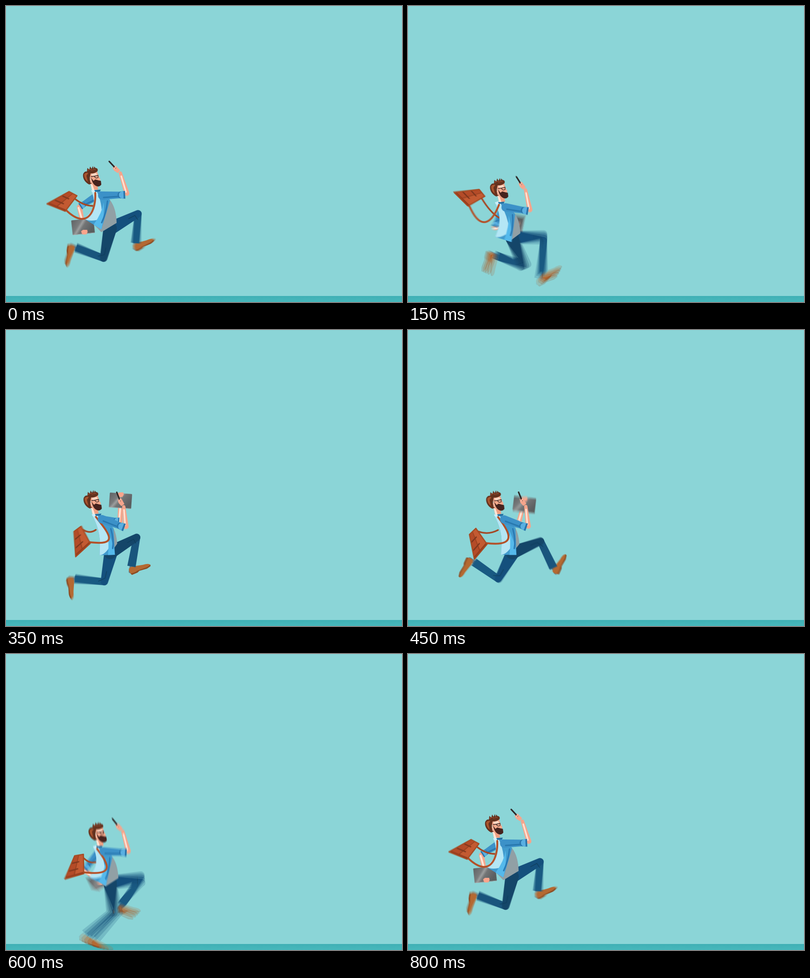
An HTML page that plays this animation: 852x640 px, repeating every 0.85 s.

```html
<!DOCTYPE html>
<html lang="en">
<head>
<meta charset="utf-8">
<title>Runner</title>
<style>
html, body { margin: 0; width: 100%; height: 100%; overflow: hidden; background: #8bd5d7; }
svg { display: block; width: 100vw; height: 100vh; }
#runner { isolation: isolate; }
#runner > g { mix-blend-mode: plus-lighter; }
</style>
</head>
<body>
<svg viewBox="0 0 852 640">
  <defs>
    <linearGradient id="metal" x2="1" y2=".5">
      <stop offset="0" stop-color="#5d6062"/><stop offset=".38" stop-color="#77797a"/>
      <stop offset=".48" stop-color="#9a9c9c"/><stop offset=".6" stop-color="#717374"/>
      <stop offset="1" stop-color="#595c5e"/>
    </linearGradient>
    <linearGradient id="ground" x2="0" y2="1">
      <stop offset="0" stop-color="#3fb0b5"/><stop offset="1" stop-color="#47b8bc"/>
    </linearGradient>
  </defs>
  <rect width="852" height="640" fill="#8bd5d7"/>
  <rect y="627" width="852" height="13" fill="url(#ground)"/>
  <g id="runner"></g>
</svg>
<script>
const LOOP = 850, STEP = 50, CYCLE = 800, STRIDE = CYCLE / 2, SHUTTER = 15, COPIES = 5;
const { sin, cos, exp, max, hypot, atan2, PI } = Math;
const RAD = PI / 180;

const wrap = (t, period) => ((t % period) + period) % period;
const f = v => v.toFixed(1);
const P = p => f(p[0]) + ',' + f(p[1]);
const mix = (a, b, u) => [a[0] + (b[0] - a[0]) * u, a[1] + (b[1] - a[1]) * u];
const add = (a, x, y) => [a[0] + x, a[1] + y];
const bend = (a, b, c, u) => mix(mix(a, b, u), mix(b, c, u), u);
const heading = (a, b) => atan2(b[1] - a[1], b[0] - a[0]) / RAD;
// Angles of hanging parts: 0 is straight down, 90 is forward
const hang = (p, angle, len) => add(p, sin(angle * RAD) * len, cos(angle * RAD) * len);

// Periodic cubic through rows of [time, ...values]
function sample(rows, t) {
  const n = rows.length;
  t = wrap(t, CYCLE);
  let i = n - 1;
  while (i > 0 && rows[i][0] > t) i--;
  const row = j => rows[wrap(j, n)];
  const time = j => row(j)[0] + CYCLE * Math.floor(j / n);
  const t1 = time(i), t2 = time(i + 1), d = t2 - t1, u = (t - t1) / d, u2 = u * u, u3 = u2 * u;
  return row(i).slice(1).map((p, k) => {
    const q = row(i + 1)[k + 1];
    const m1 = (q - row(i - 1)[k + 1]) / (t2 - time(i - 1)) * d;
    const m2 = (row(i + 2)[k + 1] - p) / (time(i + 2) - t1) * d;
    return (2 * u3 - 3 * u2 + 1) * p + (u3 - 2 * u2 + u) * m1 + (3 * u2 - 2 * u3) * q + (u3 - u2) * m2;
  });
}

// Everything above the hip follows these three rules
function bob(t) {
  const d = wrap(t, STRIDE) - 150;
  return 26 * exp(-((d / (d < 0 ? 50 : 78)) ** 2));
}
const lean = t => 6 + 6 * cos(2 * PI * (t - 190) / STRIDE);
const swing = t => (1 - sin(PI / 2 * cos(2 * PI * (t - 750) / CYCLE))) / 2;

// time, thigh, shin
const gait = [
  [0, 118, -5], [50, 112, 26], [150, 92, -3], [200, 7, -46], [250, -16, -64],
  [400, -12, -111], [450, -29, -125], [550, 22, -112], [600, 98, -37], [700, 118, -13]
];
// time, x, y, turn
const bagSwing = [
  [0, 140, 427, 37], [150, 147, 422, 60], [250, 181, 438, -4],
  [450, 158, 446, -35], [600, 167, 454, -1], [700, 150, 440, 26]
];
// collar, back, rear hem, front hem, chest, belly, tee front, tee bottom
const shirtOpen = [[194, 398], [197, 428], [168, 460], [205, 483], [224, 420], [237, 437], [238, 469], [205, 489]];
const shirtShut = [[195, 398], [203, 432], [201, 487], [234, 486], [231, 429], [237, 440], [239, 462], [232, 472]];
// shoulder, elbow, wrist, hand, phone tip
const armHigh = [[207, 410], [259, 408], [246, 361], [237, 352], [222, 336]];
const armLow = [[206, 409], [257, 428], [253, 382], [247, 371], [238, 351]];

const shape = (d, fill) => `<path d="${d}" fill="${fill}"/>`;
const poly = (pts, fill) => shape('M' + pts.map(P).join('L') + 'Z', fill);
const line = (d, color, w) => `<path d="${d}" fill="none" stroke="${color}" stroke-width="${w}" stroke-linecap="round"/>`;
const place = (p, turn, body) => `<g transform="translate(${P(p)}) rotate(${f(turn)})">${body}</g>`;

function limb(a, b, wa, wb, fill, square) {
  const dx = b[0] - a[0], dy = b[1] - a[1], len = hypot(dx, dy) || 1;
  const off = (p, w) => P(add(p, -dy / len * w / 2, dx / len * w / 2));
  const arc = w => `A${w / 2},${w / 2} 0 0 0 `;
  return shape(`M${off(a, wa)}L${off(b, wb)}${square ? 'L' : arc(wb)}${off(b, -wb)}L${off(a, -wa)}${arc(wa)}${off(a, wa)}Z`, fill);
}

const shoe =
  shape('M-1,-7Q7,-10 14,-7L30,-3Q44,-2 45,4L35,7L18,5L13,7L0,7Q-4,0 -1,-7Z', '#b1692f') +
  shape('M-2,4Q8,6 14,4L36,5L45,3L44,6L35,8L18,6L13,8L0,8Z', '#8b4b22');

function leg(t, sink, hip, main, lower) {
  const [thigh, shin] = sample(gait, t);
  const reach = .7 * sink * max(0, cos(shin * RAD));
  const knee = hang(hip, thigh, 66), cuff = hang(knee, shin, 64 + reach), heel = hang(cuff, shin, 11);
  const fold = mix(knee, hip, .12);
  return line(`M${P(cuff)}L${P(heel)}`, '#68777f', 8) + place(heel, -1.2 * shin - 35, shoe) +
    limb(knee, cuff, 15, 18, lower, true) + limb(hip, knee, 29, 16, main) +
    line(`M${P(mix(knee, cuff, .2))}L${P(fold)}L${P(mix(knee, hip, .35))}`, '#0d3b59', 1.2);
}

function sleeve(sh, el, w) {
  const cuff = mix(sh, el, .78);
  return limb(sh, cuff, w, w - 4, '#3a8fc4') +
    line(`M${P(add(sh, 3, 4))}L${P(add(cuff, -2, 3))}`, '#2675ad', 3) +
    limb(cuff, mix(sh, el, .95), w - 3, w - 1, '#2472a8', true) +
    limb(mix(sh, el, .84), mix(sh, el, .88), w - 2, w - 2, '#57aede', true);
}

function farArm(t, u, move) {
  const drift = sin(2 * PI * (t - 750) / CYCLE) * u;
  const sh = move(mix([190, 414], [210, 410], u));
  const el = move(bend([158, 434], [166, 483], [245, 413], u));
  const tab = add(move(bend([165, 477], [254, 476], [246, 369], u)), -4.5 * drift, 4 * drift);
  const hand = add(tab, 3 - 3 * u, 12 - 25 * u);
  const turn = -6 + 10 * u - 8 * drift - 75 * sin(PI * u) ** 2;
  return limb(el, hand, 11, 8, '#f4a58b') + line(`M${P(add(el, -2, 2))}L${P(mix(el, hand, .5))}`, '#fde3d5', 4) +
    sleeve(sh, el, 16) +
    place(tab, turn, '<rect x="-24" y="-16" width="48" height="32" rx="1.5" fill="url(#metal)"/>' + line('M-23,15.5H23', '#a9adad', .8)) +
    place(hand, 0, shape('M-7,-2L-3,-5L6,-5L7,0L4,5L-4,5L-6,2Z', '#f6a48c'));
}

function nearArm([sh, el, wr, ha, tip]) {
  return limb(add(el, 1, -3), wr, 11, 7, '#f4a58b') +
    line(`M${P(add(el, -1, -6))}L${P(mix(el, wr, .85))}`, '#fde0d0', 3.5) +
    place(ha, heading(wr, ha), shape('M-9,-4L0,-6L7,-4L8,-1L4,0L8,2L4,4L-8,4Z', '#f4a58b')) +
    line(`M${P(tip)}L${P(add(ha, -2, -2))}`, '#2b2725', 3.2) +
    line(`M${P(add(ha, -4, 0))}l3,-5`, '#f6b49c', 3) + sleeve(sh, el, 18);
}

const bag = (() => {
  const at = (u, v) => mix(mix([0, -21], [0, 21], u), mix([-19, -18], [-41, 32], u), v);
  const quad = (u1, v1, u2, v2, fill) => poly([at(u1, v1), at(u2, v1), at(u2, v2), at(u1, v2)], fill);
  let s = quad(0, 0, 1, 1, '#b04b25') + quad(0, 0, 1, .5, '#bf592f') +
    quad(0, .5, 1, .55, '#8f3b1d') + quad(.9, 0, 1, 1, '#963c1c');
  for (const u of [.3, .64]) s += quad(u, .35, u + .06, .95, '#7d331b');
  return s + `<path d="M${[at(0, 0), at(1, 0), at(1, 1), at(0, 1)].map(P).join('L')}Z" fill="none" stroke="#a5471f" stroke-width="2.5" stroke-linejoin="round"/>`;
})();

function torso([n, back, rear, hem, chest, belly, teeR, teeB]) {
  const l = add(n, -11, 1), r = add(n, 13, 3);
  const inner = mix(back, chest, .4), top = mix(inner, chest, .15);
  const side = `M${P(l)}Q${P(back)} ${P(mix(back, rear, .65))}L${P(rear)}`;
  return shape(`M${P(r)}L${P(chest)}Q${P(belly)} ${P(teeR)}L${P(teeB)}L${P(mix(rear, hem, .6))}Z`, '#8d9ca3') +
    shape(`${side}L${P(hem)}Q${P(mix(chest, hem, .35))} ${P(chest)}L${P(r)}Z`, '#3f97cd') +
    shape(`${side}Q${P(mix(rear, hem, .35))} ${P(mix(inner, hem, .6))}Q${P(inner)} ${P(n)}Z`, '#b2e3f2') +
    shape(`M${P(top)}Q${P(mix(inner, hem, .4))} ${P(mix(rear, hem, .55))}L${P(hem)}Q${P(mix(chest, hem, .65))} ${P(top)}Z`, '#55b9ea') +
    line(`M${P(mix(chest, inner, .35))}Q${P(mix(chest, hem, .45))} ${P(mix(inner, hem, .75))}`, '#2878b0', 3) +
    poly([l, add(n, -3, -2), add(n, 2, 6), add(n, -8, 5)], '#c9eef6') +
    poly([add(n, -4, 0), add(n, 10, -1), add(n, 8, 3), add(n, -2, 4)], '#216a9c');
}

const skull =
  shape('M180,378L196,384L198,397L185,398Z', '#f09e82') + shape('M181,380L186,386L190,398L185,398Z', '#fde6d6') +
  shape('M179,362L196,358L199,367L203,375L200,380L184,386Z', '#f3a68a') +
  shape('M183,363L194,361L196,366L186,368Z', '#fcd3c0') +
  shape('M179,386C169,381 164,371 166,363Q169,357 174,358L175,350L179,354L181,347L184,352L187,346L188,352L190,347L192,350Q199,351 197,357Q191,363 182,362L180,372L184,384Z', '#632e1e') +
  shape('M168,364Q172,359 177,361L173,367L176,380Q168,374 168,364Z', '#a9512b') +
  line('M176,356Q181,351 185,355M187,354L192,353', '#96482a', 1.6) +
  shape('M183,371L188,378L192,375L199,377L204,378L205,386Q202,391 196,390Q186,387 183,371Z', '#43221a') +
  shape('M180,374Q184,372 184,377Q185,382 182,383Z', '#f8b59c') +
  line('M183,369L190,368M190,368L198,366L198,371Q192,374 190,368', '#302322', 1.3);

function figure(t) {
  const u = swing(t), sink = bob(t), tip = lean(t);
  const move = p => add(p, .3 * tip, sink);
  const blend = (a, b) => a.map((p, i) => move(mix(p, b[i], u)));
  const shirt = blend(shirtOpen, shirtShut), neck = shirt[0];
  const hip = [224, 481 + .8 * sink];

  // The strap hangs off both ends of the bag's rim
  const [x, y, turn] = sample(bagSwing, t), sag = max(0, turn);
  const p = hang([x, y], -turn, -13), q = hang([x, y], -turn, 18), end = add(neck, -2, 34);
  const out = hang(q, 83 - sag, 66);

  return farArm(t, u, move) +
    leg(t, sink, add(hip, 2, -1), '#14507a', '#175a80') +
    leg(t + STRIDE, sink, hip, '#114468', '#15527a') +
    line(`M${P(p)}Q${P(add(mix(p, end, .5), 0, 10))} ${P(end)}`, '#a3461f', 3.4) +
    torso(shirt) +
    line(`M${P(q)}C${P(out)} ${P(add(neck, 26 - .7 * sag, 42))} ${P(add(neck, -2, 6))}`, '#b04f25', 4) +
    place([x, y], turn, bag) + place([tip, sink], 0, skull) + nearArm(blend(armHigh, armLow));
}

// Equal copies added up across a short exposure give the motion blur
const layers = Array.from({ length: COPIES }, () => {
  const g = document.createElementNS('http://www.w3.org/2000/svg', 'g');
  g.setAttribute('opacity', 1 / COPIES);
  return document.getElementById('runner').appendChild(g);
});

function draw(t) {
  layers.forEach((g, i) => {
    g.innerHTML = figure(t + (i / (COPIES - 1) - .5) * SHUTTER);
  });
}

const start = performance.now();
let shown = -1;
function tick() {
  const t = Math.floor((performance.now() - start) % LOOP / STEP) * STEP;
  if (t !== shown) draw(shown = t);
  requestAnimationFrame(tick);
}
tick();
</script>
</body>
</html>
```
